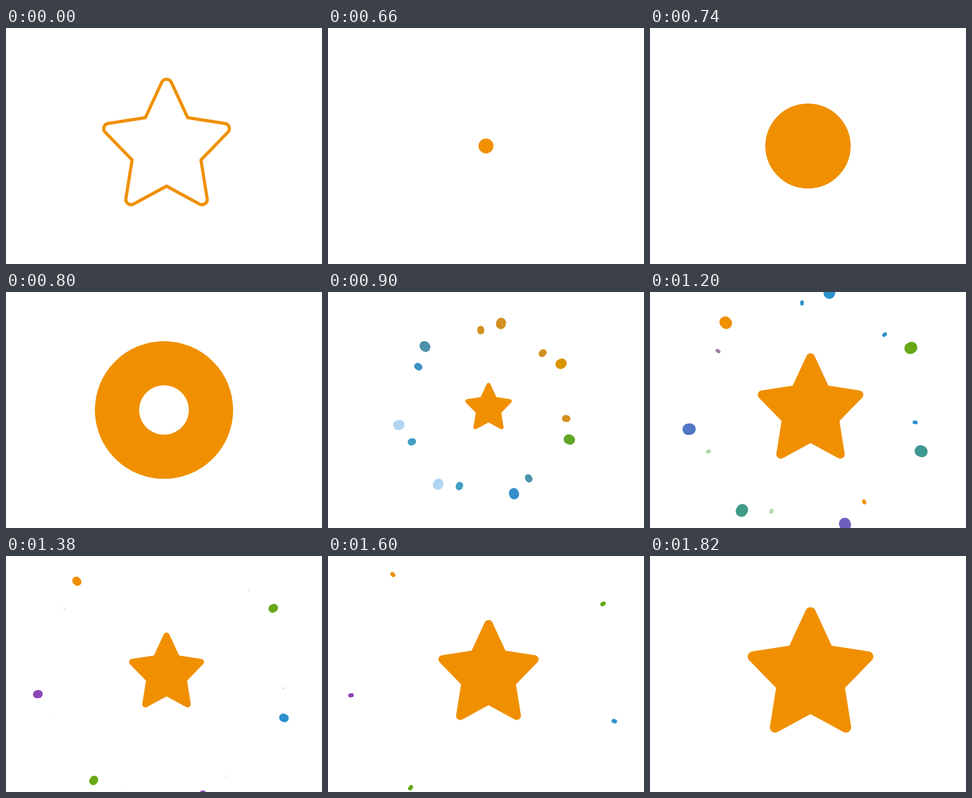
Write an HTML page with a canvas that moves like this. It is 600x450 px and loops after 2.32 s.

```html
<!DOCTYPE html>
<html lang="en">
<head>
<meta charset="utf-8">
<title>Star burst</title>
<style>
  html, body { margin: 0; height: 100%; overflow: hidden; background: #fff; }
  canvas { display: block; }
</style>
</head>
<body>
<canvas width="600" height="450"></canvas>
<script>
const ctx = document.querySelector('canvas').getContext('2d');
const LOOP = 2320, STEP = 20, START = 660, END = 1820, TAU = 2 * Math.PI;
const ORANGE = '#f09000', BLUE = '#2d92cc', GREEN = '#66a815', PURPLE = '#8d45b7';
const SKY = '#cae1f7', PALE = '#b0daa8', MAUVE = '#a082a2';

// Each pair has an outer dot and an inner dot trailing it by a fixed angle.
const ANGLES = [-78.2, -29.8, 21.5, 73.6, 124.8, 172.4, 228.4];
const TRAIL = 13.3;

// Colours each outer dot fades through, and the colour each inner dot ends in.
const OUTER = [
  [ORANGE, BLUE, BLUE], [ORANGE, GREEN, GREEN], [GREEN, BLUE], [BLUE, PURPLE],
  [SKY, BLUE, GREEN], [SKY, BLUE, PURPLE], [BLUE, ORANGE, ORANGE]
];
const INNER = [BLUE, BLUE, BLUE, ORANGE, PALE, PALE, MAUVE];

// Linear rise from 0 to 1 between two times.
const ramp = (t, from, to) => Math.min(1, Math.max(0, (t - from) / (to - from)));

function fade(t, colors) {
  const pos = ramp(t, 860, 1360) * (colors.length - 1);
  const i = Math.min(Math.floor(pos), colors.length - 2);
  const rgb = [1, 3, 5].map(at => {
    const [a, b] = [colors[i], colors[i + 1]].map(c => parseInt(c.slice(at, at + 2), 16));
    return a + (b - a) * (pos - i);
  });
  return `rgb(${rgb})`;
}

// Notches and tips of the right half; the left half mirrors them.
const CX = 304.8, CY = 217.6;
const star = new Path2D();
const right = [[345, 171], [434.7, 184.9], [370.2, 251.5], [385.1, 345.3]];
const left = right.map(([x, y]) => [2 * CX - x, y]).reverse();
const points = [...right, [CX, 301.5], ...left, [CX, 83.8]];
star.moveTo(...points[0]);
for (let i = 1; i < points.length; i += 2) {
  const next = points[(i + 1) % points.length];
  star.arcTo(...points[i], ...next, 10);
  star.lineTo(...next);
}
star.closePath();

function fillStar(scale) {
  ctx.save();
  ctx.translate(CX, CY);
  ctx.scale(scale, scale);
  ctx.translate(-CX, -CY);
  ctx.fillStyle = ORANGE;
  ctx.fill(star);
  ctx.restore();
}

// A dot is a short radial line with round caps.
function dot(angle, radius, width, color) {
  if (width <= 0) return;
  ctx.save();
  ctx.translate(300, 225.4);
  ctx.rotate(angle * Math.PI / 180);
  ctx.lineCap = 'round';
  ctx.lineWidth = width;
  ctx.strokeStyle = color;
  ctx.beginPath();
  ctx.moveTo(radius - 1.5, -6);
  ctx.lineTo(radius + 1.5, -6);
  ctx.stroke();
  ctx.restore();
}

function drawDots(t) {
  const grow = ramp(t, 840, 920), fly = ramp(t, 840, 1200);
  const outerR = 155.6 + 72.9 * fly + 48 * ramp(t, 1200, 1820);
  const innerR = 142.6 + 62.1 * fly + 25 * ramp(t, 1200, 1400);
  const outerW = 25 * grow * (1 - ramp(t, 1113, 1815));
  const innerW = 17.5 * grow * (1 - ramp(t, 1000, 1430)) ** 1.5;
  ANGLES.forEach((angle, i) => {
    const end = INNER[i], begin = end === BLUE ? ORANGE : BLUE;
    dot(angle, outerR, outerW, fade(t, OUTER[i]));
    dot(angle - TRAIL, innerR, innerW, fade(t, [begin, end, end]));
  });
}

function drawRing(t) {
  const outer = 164.7 * ramp(t, 643, 840);
  const hole = 164.7 * ramp(t, 760, 900);
  if (hole >= outer) return;
  ctx.fillStyle = ORANGE;
  ctx.beginPath();
  ctx.arc(300, 225, outer, 0, TAU);
  ctx.arc(300, 225, hole, 0, TAU, true);
  ctx.fill();
}

function draw(t) {
  ctx.clearRect(0, 0, 600, 450);
  if (t < START) {
    ctx.lineWidth = 6;
    ctx.lineJoin = 'round';
    ctx.strokeStyle = ORANGE;
    ctx.stroke(star);
  } else if (t >= END) {
    fillStar(1);
  } else {
    drawDots(t);
    drawRing(t);
    // Pop up, shrink back, then settle at full size.
    fillStar(ramp(t, 800, 1070) - 0.41 * (ramp(t, 1082, 1385) - ramp(t, 1385, 1810)));
  }
}

const begin = performance.now();
function frame() {
  const t = (performance.now() - begin) % LOOP;
  draw(Math.floor(t / STEP) * STEP);
  requestAnimationFrame(frame);
}
frame();
</script>
</body>
</html>
```
